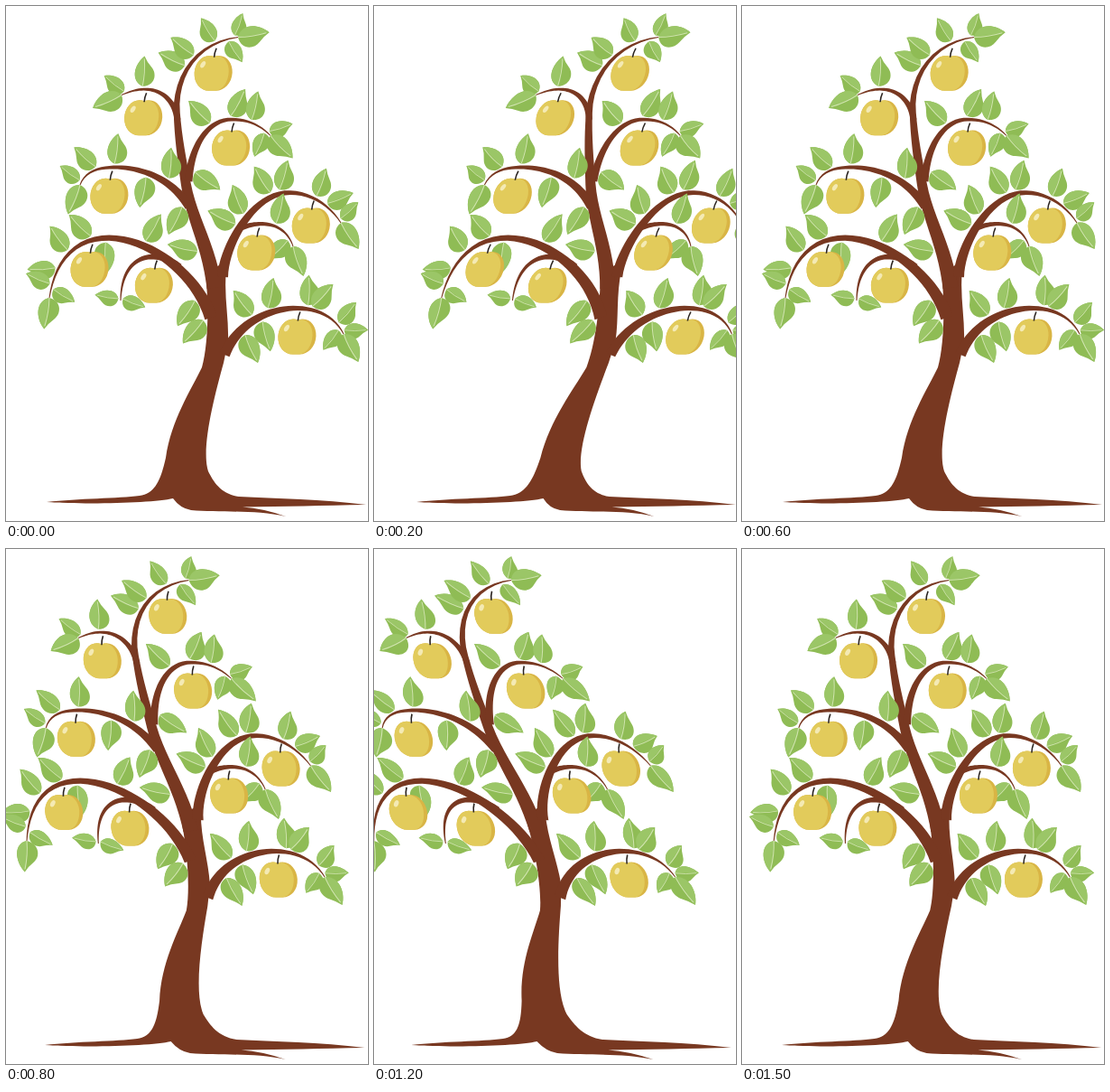
An HTML page that plays this animation: 401 px wide and 570 px high, repeating every 1.6 s.

```html
<!DOCTYPE html>
<html>
<head>
<meta charset="utf-8">
<title>Swaying apple tree</title>
<style>
  html, body { margin: 0; width: 100%; height: 100%; overflow: hidden; background: #fff; }
  svg { display: block; width: 401px; height: 570px; }
</style>
</head>
<body>
<svg viewBox="0 0 401 570">
  <defs>
    <g id="leaf">
      <path fill="#8fbc55" d="M0 0C1-13 14-15 21-8Q26-3 32 0C22 11 5 13 0 0Z"/>
      <path fill="#9bc667" d="M0 0H32C22 11 5 13 0 0Z"/>
      <path fill="none" stroke="#cfe4ae" d="M0 0Q14-2 29 0"/>
    </g>
    <g id="apple" transform="skewX(-3)">
      <path fill="#d9b545" d="M0-18C12-22 21-12 21 0C21 12 13 20 4 20H-4C-13 20-21 12-21 0C-21-12-12-22 0-18Z"/>
      <path fill="#e2cb5b" d="M0-18C9-21 17-12 17-1C17 11 11 19 4 20H-4C-13 20-21 12-21 0C-21-12-12-22 0-18Z"/>
      <ellipse cx="-12" cy="-9" rx="2.4" ry="4" fill="#f4eab4" transform="rotate(30 -12 -9)"/>
      <path fill="none" stroke="#2b2420" stroke-width="1.6" d="M0-17Q0-22 2-27"/>
    </g>
  </defs>
  <g id="tree">
    <path fill="#783821" d="M221 296C225 330 224 375 217 400C205 425 183 458 177 500C172 522 166 540 148 542C125 545 80 545 45 549
      C90 552 165 550 185 545Q193 556 205 558C235 561 275 557 310 565Q285 556 262 554.500C310 554 350 553 399 552
      C350 546 300 545 258 543C238 540 230 527 224 515C216 490 230 435 241 395L246 371C247 345 241 320 244 292L236 287Z"/>
  </g>
</svg>
<script>
const tree = document.getElementById('tree');
const LEAF = 32, HANG = 31;

// Positions along a branch run from 0 at its base to 1 at its tip.
const branches = [
  { path: 'M231 312C224 262 205 235 199 195C194 165 190 140 189 112C190 70 216 40 257 34.5',
    width: 16, apple: .91, above: [.79, .14, .92, .99, .835], below: [.965], tip: true },
  { path: 'M190 126C186 100 164 82 128 98.5',
    width: 6, apple: .69, above: [.7, .95], below: [], tip: true },
  { path: 'M202 194C206 150 226 125.5 250 125.5C268 125.5 282 132 293 143.5',
    width: 8, apple: .65, above: [.49, .65, .81, .97], below: [.08, .95], tip: true },
  { path: 'M203 222C182 190 150 178.5 120 178.5C104 178.5 88 182 82 198',
    width: 9, apple: .72, above: [.68, .26, .97, .82], below: [.03, .42], tip: true },
  { path: 'M240 300C241 268 272 207 314 206.5C338 207 358 220 371 240',
    width: 11, apple: .775, above: [.3, .37, .55, .6, .8, .87, .98], below: [], tip: true },
  { path: 'M258 247C276 238 308 236 318 266',
    width: 5, apple: .28, above: [.57], below: [.88], tip: true },
  { path: 'M227 345C200 262 66 207 48 323',
    width: 13, apple: .68, above: [.44, .67, .78, .87, .94], below: [0, .1, .61, .96], tip: true },
  { path: 'M192 289C170 270 128 270 127 326',
    width: 7, apple: .31, above: [.98], below: [.98], tip: false },
  { path: 'M242 386C256 352 290 334.5 322 334.5C346 334.5 365 345 374 363',
    width: 11, apple: .62, above: [.32, .43, .69, .72, .92, .98], below: [.2, .36, .96], tip: true },
];

function add(tag, attributes) {
  const node = document.createElementNS('http://www.w3.org/2000/svg', tag);
  for (const name in attributes) node.setAttribute(name, attributes[name]);
  tree.append(node);
  return node;
}

function grow({ path, width, apple, above, below, tip }) {
  const guide = add('path', { d: path, fill: 'none' });
  const length = guide.getTotalLength();
  const pointAt = t => guide.getPointAtLength(t * length);
  const headingAt = t => {
    const a = pointAt(Math.max(0, t - .01)), b = pointAt(Math.min(1, t + .01));
    return Math.atan2(b.y - a.y, b.x - a.x);
  };
  const halfWidth = t => .5 + width / 2 * (1 - t);
  const offset = (t, distance) => {
    const { x, y } = pointAt(t), heading = headingAt(t);
    return [x - Math.sin(heading) * distance, y + Math.cos(heading) * distance];
  };

  const left = [], right = [];
  for (let t = 0; t <= 1; t += 1 / 32) {
    left.push(offset(t, -halfWidth(t)));
    right.unshift(offset(t, halfWidth(t)));
  }
  add('polygon', { points: [...left, ...right].join(' '), fill: '#783821' });

  const up = pointAt(1).x < pointAt(0).x ? 1 : -1;
  const leaf = (t, side, turn, size) => {
    const [x, y] = offset(t, side * (halfWidth(t) + 2));
    const angle = headingAt(t) * 180 / Math.PI + side * turn;
    const scale = size / LEAF;
    const flip = Math.cos(angle * Math.PI / 180) > 0 ? -1 : 1; // the paler half faces up
    add('use', { href: '#leaf',
      transform: `translate(${x} ${y}) rotate(${angle}) scale(${scale} ${scale * flip})` });
  };
  const sizeAt = t => 34 - 9 * t ** 8;
  above.forEach((t, i) => leaf(t, up, i % 2 ? 60 : 97, sizeAt(t)));
  below.forEach(t => leaf(t, -up, 70 + 50 * (1 - t), sizeAt(t)));
  if (tip) leaf(1, 0, 0, 35);

  const { x, y } = pointAt(apple);
  add('use', { href: '#apple', transform: `translate(${x} ${y + HANG})` });
}
branches.forEach(grow);

const GROUND = 568, STEP = 100, STEPS = 16;

// The lean swings as a triangle wave between +3 and -5 steps, shearing about the ground.
function draw(now) {
  const step = Math.floor(now / STEP) % STEPS;
  const lean = 3 - Math.abs((step + 5) % STEPS - 8);
  const shear = 0.0528 * lean + 0.0009 * lean * lean;
  tree.setAttribute('transform', `matrix(1 0 ${-shear} 1 ${shear * GROUND} 0)`);
  requestAnimationFrame(draw);
}
draw(performance.now());
</script>
</body>
</html>
```
